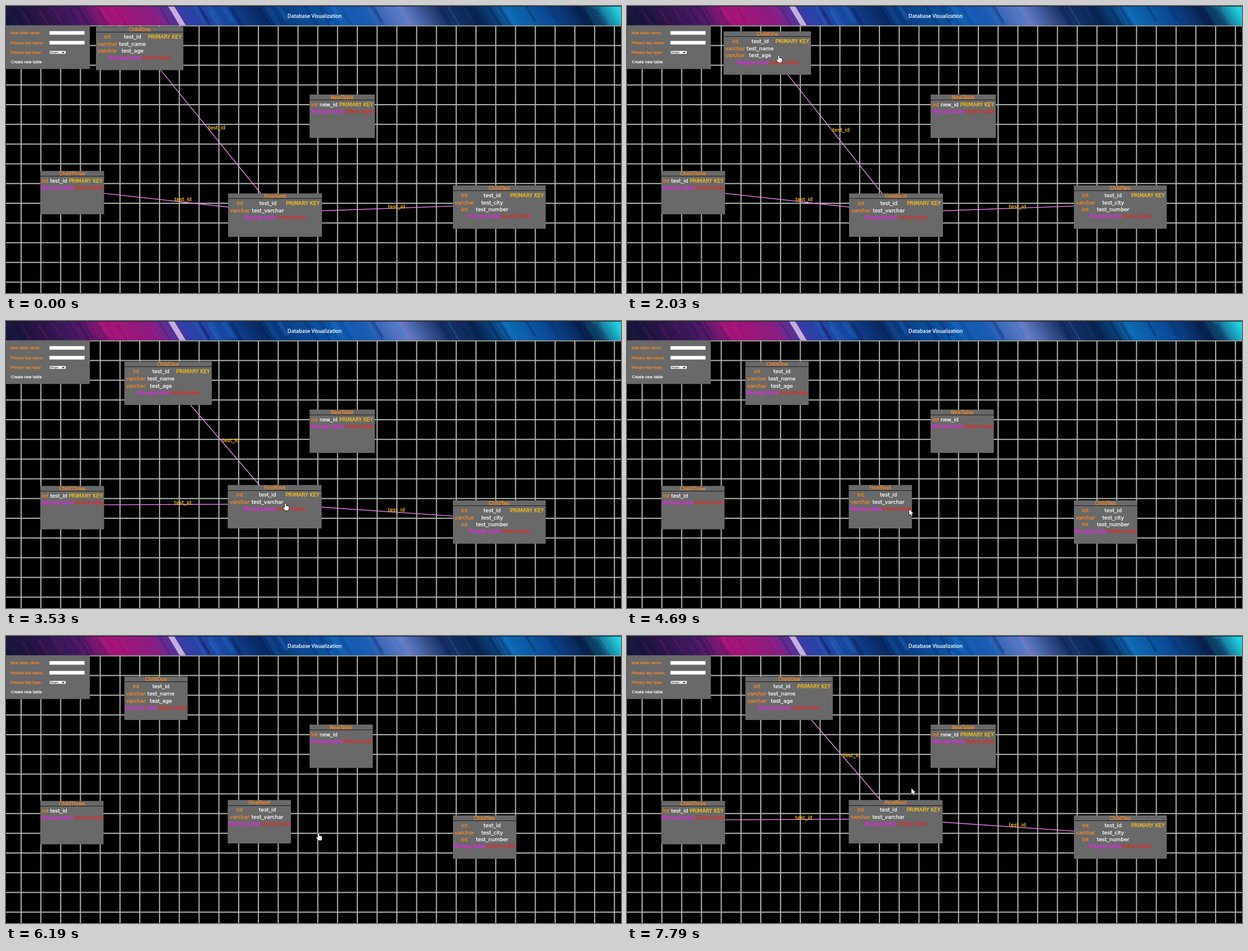
Animation, 1094 px wide and 512 px high, one loop 7.99 s. Source, as an HTML page with a canvas:

```html
<!DOCTYPE html>
<html lang="en">
<head>
<meta charset="utf-8">
<title>Database Visualization</title>
<style>
html, body { margin: 0; width: 100%; height: 100%; overflow: hidden; background: #000; }
canvas { display: block; width: 1094px; height: 512px; }
</style>
</head>
<body>
<canvas id="stage" width="1094" height="512"></canvas>
<script>
const W = 1094, H = 512, LOOP = 7990, STEP = 70;
const ctx = document.getElementById('stage').getContext('2d');
const FONT = '"DejaVu Sans", sans-serif';
const C = { box: '#696969', orange: '#ff8a24', white: '#fff', key: '#ffc61a', link: '#ee82ee',
            manage: '#f01ff0', del: '#f02424', grid: '#aeb5ae' };
const BOX_H = 77.4, BARE_W = 112.5, CELL = 9.15, BUTTON = 8.35;

// Pointer glides: from ms, to ms, x, y, and whether the hand is shown.
const APPEAR = 190;
const GLIDES = [
  [190, 260, 802, 420], [460, 660, 619, 332], [860, 1200, 468, 229], [1300, 1700, 258, 80, true],
  [1900, 2200, 308.6, 115.4, true], [2200, 2320, 387, 191], [2320, 2700, 497.6, 367.4],
  [2910, 3430, 497, 325.6, true], [3730, 3870, 502, 336], [5220, 5400, 502, 340],
  [5550, 6170, 556, 352, true], [6820, 7590, 506, 272]];
const RELOADS = [4550, 6120, 6960], RELOAD_MS = 380;

const PK = 'PRIMARY KEY';
const table = (title, x, y, w, ...rows) => ({ title, x, y, w, rows });
const one = table('ChildOne', 160, 37, 155.5, ['int', 'test_id', PK], ['varchar', 'test_name'], ['varchar', 'test_age']);
const root = table('FinalRoot', 395, 334.4, 167, ['int', 'test_id', PK], ['varchar', 'test_varchar']);
const two = table('ChildTwo', 795, 320, 165, ['int', 'test_id', PK], ['varchar', 'test_city'], ['int', 'test_number']);
const three = table('ChildThree', 61, 294.2, 113.5, ['int', 'test_id', PK]);
const fresh = table('NewTable', 540, 158, 116, ['int', 'new_id', PK]);
const TABLES = [one, fresh, three, root, two];

const clamp = (v, lo, hi) => Math.min(hi, Math.max(lo, v));

function pointerAt(t) {
  let x = 907, y = 462, hand = false;
  for (const [from, to, tx, ty, grab] of GLIDES) {
    if (t < from) break;
    const f = clamp((t - from) / (to - from), 0, 1);
    x += (tx - x) * f;
    y += (ty - y) * f;
    hand = !!grab;
  }
  return { x, y, hand };
}

// Moves a box along with the pointer while it is held.
function drag(box, home, t, from, to) {
  const a = pointerAt(from), b = pointerAt(clamp(t, from, to));
  box.x = home.x + b.x - a.x;
  box.y = home.y + b.y - a.y;
}

function rect(g, x, y, w, h, fill) {
  g.fillStyle = fill;
  g.fillRect(x, y, w, h);
}

function text(g, str, x, y, size, fill, align = 'left', family = FONT) {
  g.font = size + 'px ' + family;
  g.textAlign = align;
  g.fillStyle = g.strokeStyle = fill;
  g.lineWidth = 0.25;
  g.fillText(str, x, y);
  g.strokeText(str, x, y);
}

function banner(g) {
  const hues = ('#17183a #2a1448 #4a1a66 #a81478 #8a1c80 #3040a8 #1648a0 #082a66 #0a4690 ' +
    '#0a55a8 #1c5cb4 #6a7cc4 #1c3870 #082250 #0b68b0 #0b4894 #08204c #22d0e0').split(' ');
  const fade = g.createLinearGradient(-10, 0, W - 10, 0);
  hues.forEach((h, i) => fade.addColorStop(i / (hues.length - 1), h));
  let seed = 41;
  const rnd = () => (seed = (seed * 16807) % 2147483647) / 2147483647;
  g.save();
  g.beginPath();
  g.rect(0, 0, W, 34.4);
  g.clip();
  g.transform(1, 0, 0.6, 1, 0, 0);
  rect(g, -25, 0, W + 30, 35, fade);
  for (let i = 0; i < 70; i++) {
    const x = rnd() * W - 20, tone = rnd() < 0.6 ? '8,14,55,' : x < 290 ? '215,25,145,' : '40,125,215,';
    rect(g, x, rnd() * 30 - 20, 2 + rnd() * 9, 45, 'rgba(' + tone + (0.08 + rnd() * 0.22) + ')');
  }
  rect(g, 288, 0, 11, 35, '#c5aede');
  g.restore();
  rect(g, 0, 0, W, 1, '#1a1c30');
  text(g, 'Database Visualization', 549, 21, 9.1, C.white, 'center', '"Noto Sans", sans-serif');
}

function form(g) {
  rect(g, 0, 35, 149, BOX_H, C.box);
  ['name', 'key name', 'key type'].forEach((s, i) =>
    text(g, (i ? 'Primary ' : 'New table ') + s + ':', 8, 50.2 + i * 17.5, 6.25, C.orange));
  text(g, 'Create new table', 9, 101.8, 6.4, C.white);
  for (const y of [44.8, 62.3]) rect(g, 77.3, y, 62.4, 6.4, C.white);
  rect(g, 77, 79.3, 30, 6.8, '#333');
  rect(g, 77.6, 79.9, 28.8, 5.6, C.white);
  text(g, 'integer', 78.5, 84.2, 4.2, '#666');
  g.strokeStyle = '#000';
  g.lineWidth = 1.2;
  g.stroke(new Path2D('M99.5 81.6l2.1 2.1l2.1-2.1'));
}

function backdrop() {
  const layer = document.createElement('canvas');
  layer.width = W;
  layer.height = H;
  const g = layer.getContext('2d'), pitch = 35.18;
  rect(g, 0, 0, W, H, '#000');
  for (let x = 26.9; x < W; x += pitch) rect(g, x - 1, 35, 2, H, C.grid);
  for (let y = 35.3; y < H; y += pitch) rect(g, 0, y - 1, W, 2, C.grid);
  banner(g);
  form(g);
  return layer;
}

function link(a, b) {
  const [p, q] = [a, b].map(o => ({ x: o.x + o.w / 2 + 2.2, y: o.y + BOX_H / 2 - 4.8 }));
  ctx.strokeStyle = C.link;
  ctx.lineWidth = 1.4;
  ctx.beginPath();
  ctx.moveTo(p.x, p.y);
  ctx.lineTo(q.x, q.y);
  ctx.stroke();
  text(ctx, 'test_id', (p.x + q.x) / 2 - 0.7, (p.y + q.y) / 2, CELL, C.key);
}

// Column centres: each column as wide as its longest cell, with equal gaps.
function columns(b) {
  ctx.font = CELL + 'px ' + FONT;
  const widths = [0, 1, 2].map(c => Math.max(...b.rows.map(r => ctx.measureText(r[c] || '').width)));
  const gap = (b.w - widths.reduce((sum, w) => sum + w)) / 4;
  let x = b.x;
  return widths.map(w => (x += gap + w) - w / 2);
}

function drawTable(b, bare) {
  const w = bare ? BARE_W : b.w, mid = b.x + w / 2, cols = columns(b);
  rect(ctx, b.x, b.y, w, BOX_H, C.box);
  rect(ctx, b.x, Math.round(b.y + 9), w, 1, '#1c1c1c');
  text(ctx, b.title, mid, b.y + 7.6, 8.5, C.orange, 'center');
  const colors = [C.orange, C.white, C.key];
  b.rows.forEach((row, r) => row.slice(0, bare ? 2 : 3).forEach((s, c) =>
    text(ctx, s, cols[c], b.y + 20.8 + r * 12.7, CELL, colors[c], 'center')));
  const y = b.y + 20.6 + b.rows.length * 12.6;
  text(ctx, 'Manage table', mid + 2, y, BUTTON, C.manage, 'right');
  text(ctx, 'Delete table', mid + 4.2, y, BUTTON, C.del);
}

const ARROW = new Path2D('M0 0V10L2.3 7.9L4 11.6L5.7 10.8L4.1 7.3H7.2Z');
const HAND = new Path2D('M-1 1Q0-.5 1 1V5L2 4.4L3 5L4 4.8L5 5.5L6 5.6V9L5 12.5H-.5L-4 8Q-4 6.5-2.7 7L-1 8.3Z');

function drawPointer(t) {
  const { x, y, hand } = pointerAt(t), shape = hand ? HAND : ARROW;
  ctx.save();
  ctx.translate(x, y);
  ctx.lineWidth = 1.2;
  ctx.strokeStyle = '#111';
  ctx.fillStyle = C.white;
  ctx.stroke(shape);
  ctx.fill(shape);
  ctx.restore();
}

const back = backdrop();
const homeOne = { ...one }, homeRoot = { ...root };

function draw(time) {
  const t = Math.max(0, time - (time + STEP - 10) % STEP);
  const bare = RELOADS.some(s => t >= s && t < s + RELOAD_MS);
  drag(one, homeOne, t, 1900, 2200);
  drag(root, homeRoot, t, 2910, 3430);
  ctx.drawImage(back, 0, 0);
  if (!bare) [one, three, two].forEach(b => link(b, root));
  TABLES.forEach(b => drawTable(b, bare));
  if (time >= APPEAR) drawPointer(t);
}

const start = performance.now();
function loop() {
  draw((performance.now() - start) % LOOP);
  requestAnimationFrame(loop);
}
loop();
</script>
</body>
</html>
```
